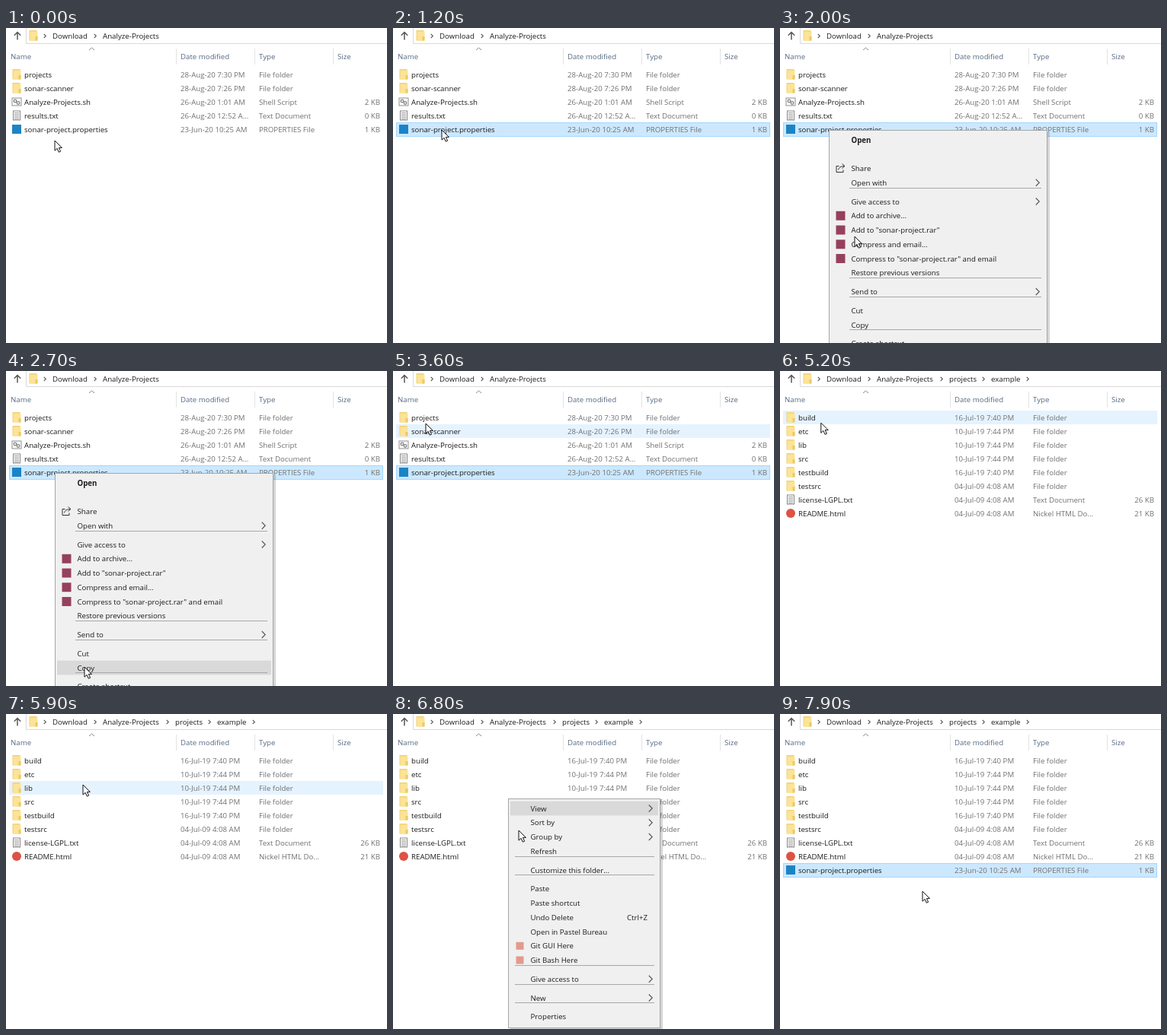
Animation of 500 by 414 pixels, one loop 8000 ms. Source, as an HTML page:

```html
<!DOCTYPE html>
<html lang="en">
<head>
<meta charset="utf-8">
<title>File explorer</title>
<style>
  html, body { margin: 0; width: 100%; height: 100%; overflow: hidden; background: #fff; }
  svg { display: block; width: 100vw; height: 100vh; }
  text { font: 9.7px "Open Sans", "Noto Sans", sans-serif; white-space: pre; }
  .bold { font-weight: 700; }
  .end { text-anchor: end; }
</style>
</head>
<body>
<svg viewBox="0 0 500 414">
  <g id="screen"></g>
  <path id="cursor" d="M0 0V13.2L3.1 10.3L5.3 15.2L7.6 14.2L5.4 9.4H9.4Z" fill="#fff" stroke="#111" stroke-width="1"/>
</svg>
<script>
const LOOP = 8000, LAG = 100;
const ROW = 18, FIRST = 61, STEP = 18.75, GAP = 6;
const INK = '#1c1c1c', DIM = '#707070', HEAD = '#566a84';

const rect = (x, y, w, h, fill, more = '') =>
  `<rect x="${x}" y="${y}" width="${w}" height="${h}" fill="${fill}" ${more}/>`;
const line = (d, stroke, width = 1) =>
  `<path d="${d}" fill="none" stroke="${stroke}" stroke-width="${width}"/>`;
const text = (x, y, label, fill = INK, cls = '') =>
  `<text x="${x}" y="${y + 3.6}" fill="${fill}" class="${cls}">${label}</text>`;
const chevron = (x, y, s, color) => line(`M${x - s / 2} ${y - s}l${s} ${s}l${-s} ${s}`, color, 1.1);

// Icons are centred on (x, y)
const icons = {
  folder: (x, y) => rect(x - 5.5, y - 7, 10, 13.5, '#f3d273') +
    rect(x - 4.5, y - 5.5, 10, 12, '#fbe398') + rect(x + 2.5, y + 1, 3, 5.5, '#efc95f'),
  page: (x, y) => rect(x - 4.5, y - 6, 9, 12, '#fff', 'stroke="#858585"') +
    line([-3.5, -1.5, .5, 2.5, 4.5].map(d => `M${x - 3} ${y + d}h6`).join(''), '#8d8d8d', .8),
  script: (x, y) => rect(x - 6, y - 5, 12, 10, '#fafafa', 'stroke="#929292"') +
    `<g fill="none" stroke="#858585" stroke-width="1.3"><circle cx="${x - 2}" cy="${y - 1}" r="1.8"/>` +
    `<circle cx="${x + 2}" cy="${y + 1.5}" r="1.8"/></g>`,
  editor: (x, y) => rect(x - 6, y - 6, 12, 12, '#1c84c6'),
  browser: (x, y) => `<circle cx="${x}" cy="${y}" r="6" fill="#dc5244"/>`,
  archive: (x, y) => rect(x - 6, y - 6, 12, 12, '#96405c'),
  git: (x, y) => rect(x - 5, y - 5, 10, 10, '#e39a8c'),
  share: (x, y) => line(`M${x - 2} ${y - 3}h-3.5v8h9v-3M${x - 3} ${y + 2}q1 -5 8 -5M${x + 2} ${y - 6}l3.5 3l-3.5 3`, '#333')
};

const folder = (name, date) => ['folder', name, date, 'File folder', ''];
const props = ['editor', 'sonar-project.properties', '23-Jun-20 10:25 AM', 'PROPERTIES File', '1 KB'];
const root = [
  folder('projects', '28-Aug-20 7:30 PM'),
  folder('sonar-scanner', '28-Aug-20 7:26 PM'),
  ['script', 'Analyze-Projects.sh', '26-Aug-20 1:01 AM', 'Shell Script', '2 KB'],
  ['page', 'results.txt', '26-Aug-20 12:52 A...', 'Text Document', '0 KB'],
  props
];
const projects = [folder('example', '28-Aug-20 7:33 PM')];
const example = [
  folder('build', '16-Jul-19 7:40 PM'),
  folder('etc', '10-Jul-19 7:44 PM'),
  folder('lib', '10-Jul-19 7:44 PM'),
  folder('src', '10-Jul-19 7:44 PM'),
  folder('testbuild', '16-Jul-19 7:40 PM'),
  folder('testsrc', '04-Jul-09 4:08 AM'),
  ['page', 'license-LGPL.txt', '04-Jul-09 4:08 AM', 'Text Document', '26 KB'],
  ['browser', 'README.html', '04-Jul-09 4:08 AM', 'Nickel HTML Do...', '21 KB']
];

// Screens: start time, files, path depth, selected row
const screens = [
  { at: 0, files: root, depth: 2, picked: -1 },
  { at: 1200, files: root, depth: 2, picked: 4 },
  { at: 4000, files: projects, depth: 3, picked: -1 },
  { at: 4900, files: example, depth: 4, picked: -1 },
  { at: 7600, files: [...example, props], depth: 4, picked: 8 }
];
const crumbs = [['Download', 61], ['Analyze-Projects', 127], ['projects', 222], ['example', 277]];
const crumbArrows = [51, 117, 212, 267, 325];

// Menu items: label, icon, right-hand part ('>' opens a submenu); '-' is a separator
const menus = [
  { from: 1300, to: 3050, live: 2150, x: 64, y: 134, w: 287, h: 300, sepX: 91, items: [
    ['Open', 'bold'], [''], ['Share', 'share'], ['Open with', '', '>'], '-',
    ['Give access to', '', '>'], ['Add to archive...', 'archive'],
    ['Add to "sonar-project.rar"', 'archive'], ['Compress and email...', 'archive'],
    ['Compress to "sonar-project.rar" and email', 'archive'], ['Restore previous versions'], '-',
    ['Send to', '', '>'], '-', ['Cut'], ['Copy'], '-', ['Create shortcut']] },
  { from: 6600, to: 7500, live: 6600, x: 151, y: 111, w: 200, h: 301, sepX: 160, items: [
    ['View', '', '>'], ['Sort by', '', '>'], ['Group by', '', '>'], ['Refresh'], '-',
    ['Customize this folder...'], '-', ['Paste'], ['Paste shortcut'],
    ['Undo Delete', '', 'Ctrl+Z'], ['Open in Pastel Bureau'],
    ['Git GUI Here', 'git'], ['Git Bash Here', 'git'], '-',
    ['Give access to', '', '>'], '-', ['New', '', '>'], '-', ['Properties']] }
];

// Pointer path: time, x, y
const path = [
  [0, 64, 148], [300, 64, 148], [800, 64, 134], [1500, 64, 134], [2000, 98, 274],
  [2600, 103, 389], [3100, 103, 389], [3400, 48, 86], [3600, 43, 69], [3800, 42, 62],
  [5000, 42, 62], [5700, 101, 93], [6000, 101, 93], [6400, 151, 111], [6600, 152, 112],
  [6700, 156, 122], [6800, 165, 153], [7200, 190, 231], [7500, 190, 231], [7800, 187, 233]
];

function pointer(t) {
  const i = path.findIndex(p => p[0] > t);
  if (i < 0) return path[path.length - 1].slice(1);
  if (!i) return path[0].slice(1);
  const [t0, x0, y0] = path[i - 1], [t1, x1, y1] = path[i];
  const u = (t - t0) / (t1 - t0), k = u * u * (3 - 2 * u);
  return [x0 + (x1 - x0) * k, y0 + (y1 - y0) * k];
}

function drawFrame({ depth }) {
  let out = rect(0, 0, 500, 414, '#fff') + line('M26.5 0V20.5H500', '#d9d9d9') +
    line('M15 15.5V5.5M10.8 9.7L15 5.5L19.2 9.7', '#555', 1.5) + icons.folder(36, 10);
  crumbs.slice(0, depth).forEach(([label, x]) => out += text(x, 10, label));
  crumbArrows.slice(0, depth === 4 ? 5 : depth).forEach(x => out += chevron(x, 10.5, 2.6, '#555'));
  [['Name', 6], ['Date modified', 229], ['Type', 332], ['Size', 435]]
    .forEach(([label, x]) => out += text(x, 37, label, HEAD));
  return out + line('M223.5 27V48M326.5 27V48M429.5 27V48', '#e3e3e3') +
    line('M109 29L112.5 26L116 29', '#888');
}

function drawFiles({ files, picked }, hover) {
  return files.map(([icon, name, date, type, size], i) => {
    const y = FIRST + i * ROW;
    const back = i === picked
      ? rect(4.5, y - 8.5, 490, 18, '#cce8ff', 'stroke="#a5d6fb"')
      : i === hover ? rect(4, y - 9, 491, ROW, '#e5f3ff') : '';
    return back + icons[icon](14, y) + text(24, y, name) + text(229, y, date, DIM) +
      text(332, y, type, DIM) + text(491, y, size, DIM, 'end');
  }).join('');
}

function drawMenu({ x, y, w, h, sepX, items }, hoverY) {
  const right = x + w;
  let out = rect(x + 3, y + 3, w, h, '#000', 'opacity=".16"') +
    rect(x + .5, y + .5, w - 1, h, '#f0f0f0', 'stroke="#a6a6a6"');
  let mid = y + 13;
  for (const item of items) {
    if (item === '-') {
      out += line(`M${sepX} ${Math.round(mid - 12.5) + .5}H${right - 8}`, '#a8a8a8');
      mid += GAP;
      continue;
    }
    const [label, icon, extra] = item;
    if (label && Math.abs(hoverY - mid) < STEP / 2)
      out += rect(x + 3, mid - STEP / 2, w - 6, STEP, '#d9d9d9');
    if (icons[icon]) out += icons[icon](x + 15.5, mid);
    out += text(x + 29.5, mid, label, INK, icon === 'bold' ? 'bold' : '');
    if (extra === '>') out += chevron(right - 13, mid, 4.5, '#555');
    else if (extra) out += text(right - 17, mid, extra, INK, 'end');
    mid += STEP;
  }
  return out;
}

const screen = document.getElementById('screen');
const cursor = document.getElementById('cursor');
let shown = '';

function draw(now) {
  const t = now % LOOP;
  const [x, y] = pointer(t), hoverY = pointer(t - LAG)[1];
  const view = screens.filter(s => s.at <= t).pop();
  const menu = menus.find(m => t >= m.from && t < m.to);
  const row = menu ? -1 : Math.floor((hoverY - FIRST + ROW / 2) / ROW);
  const markup = drawFrame(view) + drawFiles(view, row) +
    (menu ? drawMenu(menu, t < menu.live ? -99 : hoverY) : '');
  if (markup !== shown) screen.innerHTML = shown = markup;
  cursor.setAttribute('transform', `translate(${x.toFixed(1)} ${y.toFixed(1)})`);
}

const start = performance.now();
function tick() {
  draw(performance.now() - start);
  requestAnimationFrame(tick);
}
tick();
</script>
</body>
</html>
```
